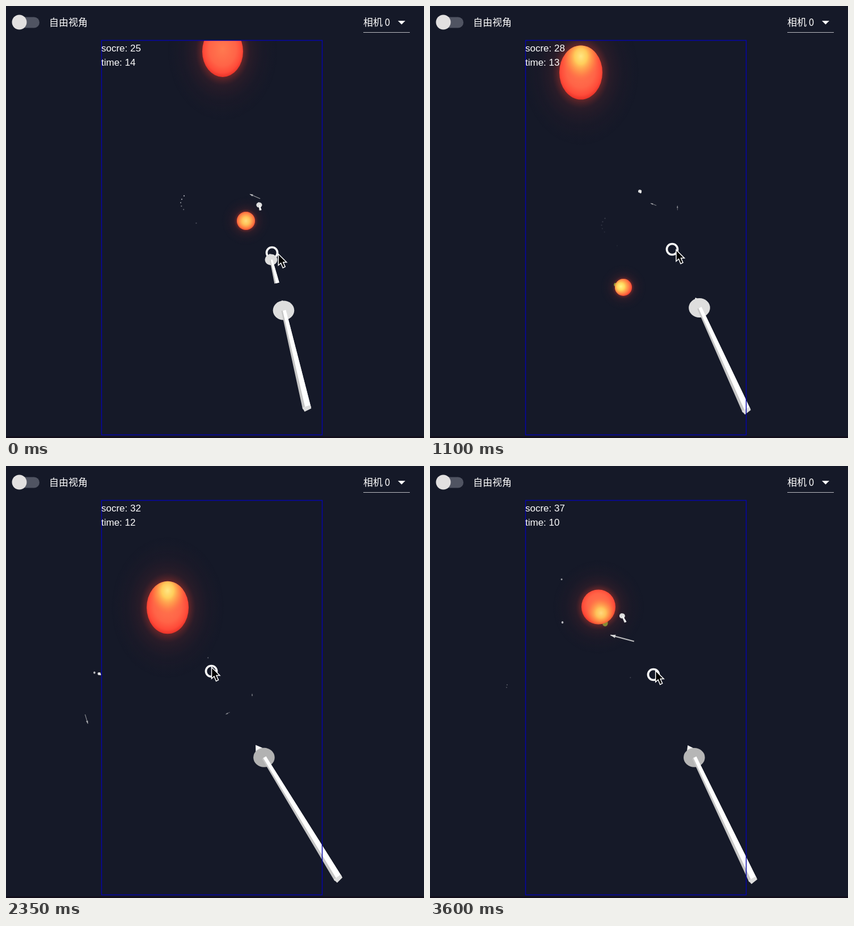
An HTML page with a canvas that plays this animation: 737 by 760 pixels, repeating every 3.65 s.

```html
<!DOCTYPE html>
<html lang="zh">
<head>
<meta charset="utf-8">
<style>
html, body { margin: 0; width: 737px; height: 760px; overflow: hidden; background: #151928; }
canvas, svg { position: absolute; left: 0; top: 0; display: block; }
text { fill: #fff; font: 17px "Liberation Sans", Arial, sans-serif; }
.zh { font-family: "Noto Sans CJK SC", "Noto Sans CJK", "Noto Sans", sans-serif; }
</style>
</head>
<body>
<canvas id="scene" width="737" height="760"></canvas>
<svg width="737" height="760">
  <rect y="757" width="737" height="3" fill="#120f1b"/>
  <rect x="14" y="19.5" width="45" height="19" rx="9.5" fill="#505462"/>
  <circle cx="23.5" cy="28.5" r="13" fill="#e2e0e0"/>
  <text class="zh" x="76" y="35">自由视角</text>
  <text class="zh" x="630" y="34.5">相机 0</text>
  <path d="M691 26h13l-6.5 6.5z" fill="#fff"/>
  <path d="M630 46.5h82" stroke="#b9bac0"/>
  <rect x="168.5" y="60.5" width="389" height="694" fill="none" stroke="#0505a8" stroke-width="1.5"/>
  <text id="score" x="168" y="80"></text>
  <text id="clock" x="168" y="105"></text>
</svg>
<script>
const LOOP = 3650, STEP = 50, FLIGHT = 109;
const c = document.getElementById('scene').getContext('2d');
const scoreText = document.getElementById('score');
const clockText = document.getElementById('clock');

// time, x, y of the aiming ring
const aim = [
  [0, 469, 434], [550, 427, 428], [1150, 427, 428], [1650, 303, 449], [1850, 303, 449],
  [2200, 362, 361], [2350, 362, 361], [2550, 220, 385], [2800, 340, 402], [3000, 362, 402],
  [3200, 374, 305], [3600, 394, 367]
];
// birth, vanishing point, time of the hit
const shots = [
  [-286, 430, 270, 150], [-76, 436, 316, 200], [134, 410, 300, 420], [346, 370, 280, 600],
  [558, 349, 267], [1288, 230, 310, 1600], [1498, 119, 313], [1708, 119, 314],
  [2528, 214, 131], [2738, 208, 215], [3096, 270, 190, 3400], [3306, 293, 167]
];
// bounced arrows: time, centre, angle, length
const bounced = [
  [[0, 439, 335, 3.56, 20], [700, 437, 340, 4.7, 9], [2350, 434, 403, 4.7, 5]],
  [[600, 406, 355, .53, 81], [1100, 394, 349, -2.76, 11], [2350, 391, 435, -3.6, 8]],
  [[1600, 178, 403, 1.3, 36], [2700, 125, 465, 1.27, 8]],
  [[3400, 330, 270, 2.2, 55], [3600, 339, 303, 3.4, 43]]
];
// glow: highlight x, y and strength; keys: time, centre, radius
const fruits = [
  { glow: [0, 0, .8], round: 0, keys: [[-600, 430, 330, 23], [0, 423, 378, 16], [1000, 412, 455, 4]] },
  { glow: [-.3, -.1, 1], round: 430, keys: [[0, 382, 80, 36], [700, 367, 425, 28], [1100, 341, 495, 15], [1400, 325, 520, 0]] },
  { glow: [0, -.6, .9], round: 430, keys: [[500, 309, -155, 38], [1100, 266, 117, 38], [1850, 212, 457, 31], [2300, 140, 550, 0]] },
  { glow: [0, -.65, .9], round: 430, keys: [[1350, 293, -194, 37], [2350, 285, 249, 37], [2700, 282, 440, 29], [2950, 278, 510, 0]] },
  { glow: [.15, .35, .8], round: 260, keys: [[2800, 352, -20, 36], [3000, 338, 80, 36], [3600, 297, 248, 30]] }
];

const ramp = (v, a, b) => Math.max(0, Math.min(1, (v - a) / (b - a)));
const alive = (keys, t) => t >= keys[0][0] && t <= keys[keys.length - 1][0] + STEP;

function pose(keys, t) {
  let i = 1;
  while (i < keys.length - 1 && keys[i][0] < t) i++;
  const a = keys[i - 1], b = keys[i], k = ramp(t, a[0], b[0]);
  return a.slice(1).map((v, j) => v + (b[j + 1] - v) * k);
}

// The held arrow and the pointer follow the ring.
function hold(t) {
  const [x, y] = pose(aim, t), dx = x - 427, dy = y - 428;
  return {
    x, y,
    px: x + 7 + dx * .1,
    py: y + Math.max(-7, 1 + dy * .2),
    head: [475 + dx * .35 - dy * .04, 531 + dy * .33 + Math.abs(dx) * .06],
    tail: [558 - dx * .53 - Math.max(0, dx) * .14 + dy * .1, 712 - dy * .3 - dx * dx * .0014],
    tip: [-7 + dx * .1 + dy * .02, -18 + dy * .06],
    shade: 222 + Math.min(0, dy) * .65
  };
}

function ellipse(x, y, rx, ry, fill) {
  c.beginPath();
  c.ellipse(x, y, rx, ry, 0, 0, 7);
  c.fillStyle = fill;
  c.fill();
}
function poly(points, fill) {
  c.beginPath();
  points.forEach(p => c.lineTo(...p));
  c.closePath();
  c.fillStyle = fill;
  c.fill();
}

function arrow([hx, hy], [tx, ty], r, [ox, oy], shade) {
  const d = Math.hypot(tx - hx, ty - hy) || 1, o = Math.hypot(ox, oy) || 1;
  const ux = (tx - hx) / d, uy = (ty - hy) / d;
  const sx = -oy / o * r * .92, sy = ox / o * r * .92;
  const near = r * .22, far = r * .4;
  const at = (x, y, w, k = 0) => [x - uy * w + ux * k, y + ux * w + uy * k];
  poly([[hx + ox, hy + oy], [hx + sx, hy + sy], [hx - sx, hy - sy]], '#f6f6f6');
  ellipse(hx, hy, r, r * .9, `rgb(${shade},${shade},${shade})`);
  poly([at(hx, hy, near), at(hx, hy, -near), at(tx, ty, -far), at(tx, ty, far)], '#c6c6c6');
  poly([at(hx, hy, near * .4), at(hx, hy, -near), at(tx, ty, -far), at(tx, ty, far * .35)], '#fff');
  if (r > 14) poly([at(tx, ty, far, -3), at(tx, ty, -far, -4), at(tx, ty, -far, 2), at(tx, ty, far * .7, 5)], '#dedede');
}

function flying([birth, vx, vy, end = LOOP], t) {
  if (t < birth || t >= end) return;
  const [px, py] = hold(birth).head;
  const age = t - birth, z = 1 + age / FLIGHT;
  const drop = 300 * (age / 1000) ** 2 / z;
  const at = q => [vx + (px - vx) / q, vy + (py - vy) / q + drop];
  const head = at(z), tail = at(z - .41), r = 18.5 / z;
  if (r < 2.4) {
    c.globalAlpha = r / 2.4;
    ellipse(...head, Math.max(.9, r * .85), Math.max(1, r), '#d0d0d4');
    c.globalAlpha = 1;
    return;
  }
  const dx = head[0] - tail[0], dy = head[1] - tail[1], k = r / Math.hypot(dx, dy);
  arrow(head, tail, r, [dx * k, dy * k], 222);
}

function tumbling(keys, t) {
  if (!alive(keys, t)) return;
  const [x, y, a, len] = pose(keys, t), s = Math.min(4, 1 + len * .05);
  c.save();
  c.translate(x, y);
  c.rotate(a);
  c.globalAlpha = Math.min(.85, .3 + len * .02);
  c.fillStyle = '#d8d8d8';
  c.fillRect(-len / 2, -s * .3, len, s * .6);
  poly([[len / 2, 0], [len / 2 - s * 2.8, s], [len / 2 - s * 2.8, -s]], '#e4e4e4');
  c.restore();
}

function shine(x, y, size, inner, stops) {
  const g = c.createRadialGradient(x, y, inner, x, y, size);
  stops.forEach(([k, color]) => g.addColorStop(k, color));
  return g;
}

function fruit({ glow: [gx, gy, strength], round, keys }, t) {
  if (!alive(keys, t)) return;
  const [x, y, r] = pose(keys, t);
  if (r < 1) return;
  const hot = strength * ramp(t - keys[0][0], 150, 600);
  c.save();
  c.translate(x, y);
  c.scale(r, r * (1 + .25 * ramp(round - y, 0, 150)));
  ellipse(0, 0, 2.7, 2.7, shine(0, 0, 2.7, .8, [
    [0, 'rgba(255,70,45,.55)'], [.12, 'rgba(255,65,45,.3)'], [.28, 'rgba(180,50,45,.13)'],
    [.6, 'rgba(110,35,45,.06)'], [1, 'rgba(60,25,45,0)']]));
  if (gx) {
    const d = Math.hypot(gx, gy);
    c.globalAlpha = hot * .8;
    ellipse(gx / d, gy / d, .16, .2, '#a6c63c');
    c.globalAlpha = 1;
  }
  ellipse(0, 0, 1, 1, shine(0, -.1, 1.1, 0, [
    [0, '#ff7a50'], [.6, '#ff6447'], [.85, '#ff4b39'], [1, '#e93228']]));
  c.globalAlpha = hot;
  ellipse(0, 0, 1, 1, shine(gx, gy, r < 20 ? 1.4 : .95, 0, [
    [0, '#fff58a'], [.3, 'rgba(255,228,95,.9)'], [.65, 'rgba(255,165,70,.5)'], [1, 'rgba(255,90,60,0)']]));
  c.restore();
}

function specks(t) {
  for (let i = 0; i < 6; i++) {
    const off = i > 4 ? 18 : 0;
    c.globalAlpha = (1 - ramp(t, 0, 1500)) * (.85 - i * .11);
    ellipse(314 - 6 * Math.sin(i * .75) + off - t * .005, 334 + i * 6 + off + t * .036, 1.1, 1.2, '#b8bac2');
  }
  c.globalAlpha = 1;
}

const cursor = new Path2D('M0 0V20L4.5 16L8 24.5L12 22.5L8.5 14.5H14.5Z');

function draw(t) {
  const h = hold(t);
  c.clearRect(0, 0, 737, 760);
  c.save();
  c.beginPath();
  c.rect(0, 61, 737, 696);
  c.clip();
  specks(t);
  fruits.forEach(f => fruit(f, t));
  c.beginPath();
  c.arc(h.x, h.y, 9.5, 0, 7);
  c.strokeStyle = '#f8f8f8';
  c.lineWidth = 3.7;
  c.stroke();
  bounced.forEach(b => tumbling(b, t));
  shots.forEach(s => flying(s, t));
  arrow(h.head, h.tail, 18.8, h.tip, h.shade);
  c.translate(h.px, h.py);
  c.fillStyle = '#000';
  c.fill(cursor);
  c.strokeStyle = '#fff';
  c.lineWidth = 1.5;
  c.stroke(cursor);
  c.restore();
  const gained = 3 * ramp(t, 0, 600) + 4 * ramp(t, 1300, 1750) + 5 * ramp(t, 3100, 3550);
  scoreText.textContent = 'socre: ' + (25 + Math.floor(gained));
  clockText.textContent = 'time: ' + (14 - Math.floor((t + 500) / 1000));
}

const start = performance.now();
function tick() {
  const t = (performance.now() - start) % LOOP;
  draw(Math.floor(t / STEP) * STEP);
  requestAnimationFrame(tick);
}
tick();
</script>
</body>
</html>
```
